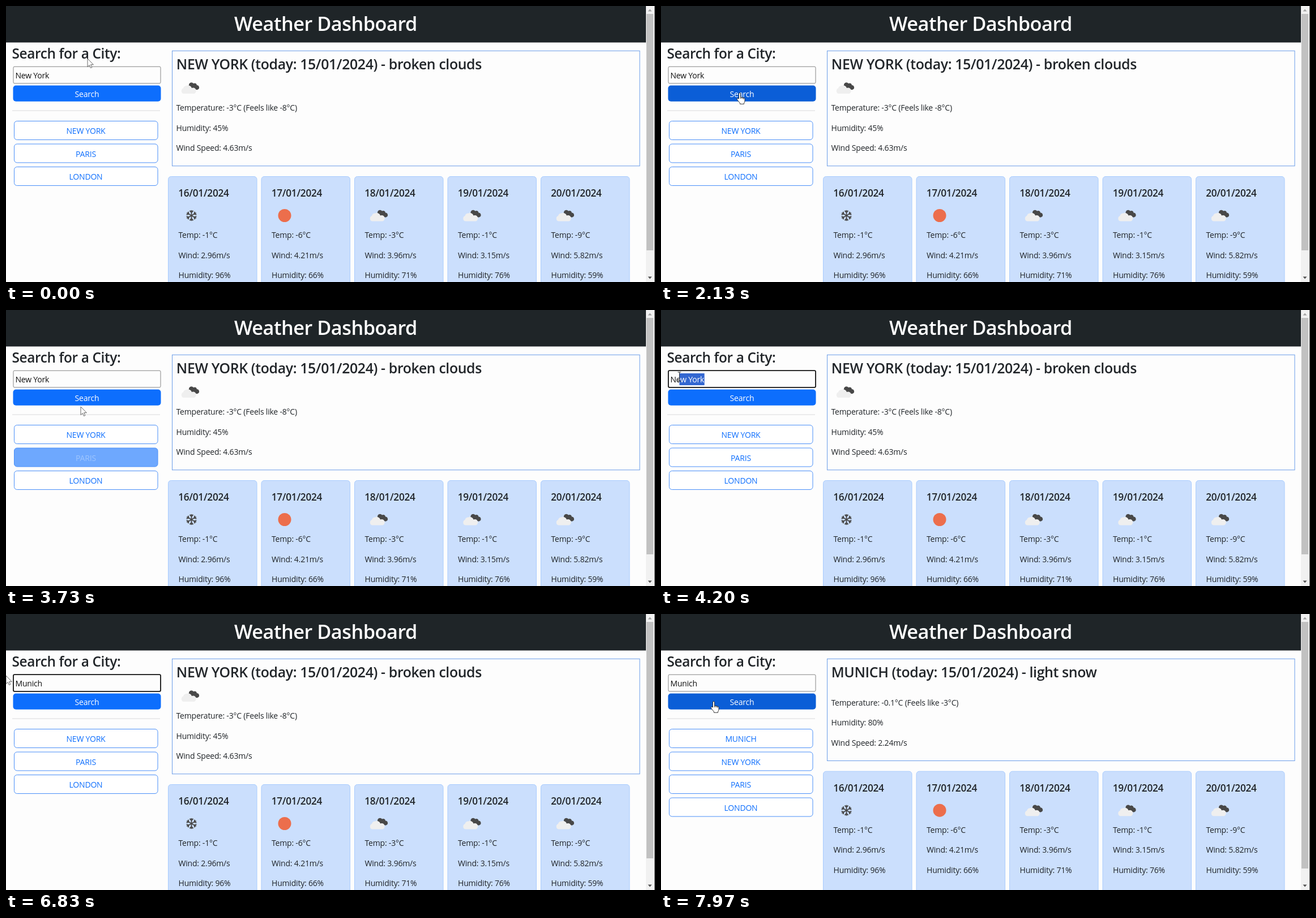
Write an HTML page that moves like this. It is 1146 by 488 pixels and loops after 8 s.

```html
<!DOCTYPE html>
<html lang="en">
<head>
<meta charset="utf-8">
<title>Weather Dashboard</title>
<style>
html, body { margin: 0; width: 100%; height: 100%; overflow: hidden; background: #fdfdfd; }
svg { display: block; }
text { font: 14px "Open Sans", "Noto Sans", sans-serif; letter-spacing: -.0145em; fill: #212529; }
.head { font-weight: 600; font-size: 24.4px; }
.date { font-weight: 600; font-size: 17.2px; }
.mid { text-anchor: middle; }
</style>
</head>
<body>
<svg width="1146" height="488" viewBox="0 0 1146 488">
  <defs>
    <g id="cloud">
      <path fill="#484848" d="M18 12a4 4 0 0 1-3-7a4.500 4.500 0 0 1 8-3a4 4 0 0 1 6 3a4 4 0 0 1 2 7.500q-2 1.500-4 0z"/>
      <path fill="#efefef" d="M5.500 20a5 5 0 0 1-.5-9.500a6 6 0 0 1 6-4.500a6.500 6.500 0 0 1 9 4a5 5 0 0 1 4.500 10z"/>
    </g>
    <path id="arm" d="M0-9.500V9.500M-3-8.500L0-5.500 3-8.500M-3 8.500L0 5.500 3 8.500"/>
    <g id="snow" fill="none" stroke="#484848" stroke-width="1.900">
      <use href="#arm"/><use href="#arm" transform="rotate(60)"/><use href="#arm" transform="rotate(120)"/>
    </g>
    <circle id="sun" r="11.500" fill="#ec6e4c"/>
    <clipPath id="selClip"><rect id="clipBox" y="112" height="21"/></clipPath>
  </defs>

  <rect width="1130" height="64.500" fill="#1f2528"/>
  <text x="564.500" y="43.500" class="mid" style="font-weight:600;font-size:34.300px;fill:#fff">Weather Dashboard</text>

  <text x="10.500" y="93" class="head">Search for a City:</text>
  <rect id="field" x="13" y="107.200" width="260" height="29.600" rx="2" fill="#fdfdfd"/>
  <text id="typed" x="16.500" y="128" style="fill:#111"></text>
  <rect id="caret" y="114" width="1" height="18"/>
  <g id="selection">
    <rect id="selBox" y="112" height="21" fill="#3367d1"/>
    <text x="16.500" y="128" clip-path="url(#selClip)" style="fill:#fff">New York</text>
  </g>
  <rect id="search" x="12.500" y="140.500" width="261" height="28.200" rx="5"/>
  <text x="143" y="161" class="mid" style="fill:#fff">Search</text>
  <path d="M11 185H272" stroke="#d9dadb"/>
  <g id="list"></g>

  <rect id="panel" x="293.500" y="79.300" width="825.500" fill="none" stroke="#6a9ce8"/>
  <text id="headline" x="300.800" y="111.500" class="head" style="font-size:24.850px"></text>
  <use id="todayIcon" href="#cloud" x="308" y="135"/>
  <g id="details">
    <text x="300.500" y="185"></text><text x="300.500" y="220.500"></text><text x="300.500" y="256.300"></text>
  </g>
  <g id="forecast"></g>

  <rect x="1130" width="15" height="488" fill="#f1f1f1"/>
  <rect id="thumb" x="1131" y="14" width="12" fill="#c1c1c1"/>
  <path d="M1133.500 9.500l3.500-4 3.500 4z" fill="#a3a3a3"/>
  <path d="M1133.500 478.500l3.500 4 3.500-4z" fill="#505050"/>
  <path d="M1145.500 0V488" stroke="#444"/>

  <g id="cursor">
    <path id="arrow" d="M0 0V14.500L3.300 11.500 5.500 16.500 7.800 15.500 5.600 10.700H10.300Z" fill="#fff" stroke="#555" stroke-width=".9"/>
    <g id="hand" stroke="#222" stroke-width=".9">
      <path fill="#fff" d="M-1.500 10V1a1.500 1.500 0 0 1 3 0V7l5.500 1.300q2 .5 2 2.500v3q0 2-1.500 4v1.500h-7v-1.500l-4.500-5.500q-1.500-2.300 0-3 1-.4 2.500.700z"/>
      <path fill="none" d="M1.500 7v3M4 7.700v2.500M6.500 8.300v2.500"/>
    </g>
    <path id="beam" d="M-3-8H3M0-8V8M-3 8H3" stroke="#333" fill="none"/>
  </g>
</svg>
<script>
const LOOP = 8000, LOADED = 7970, CLICK = 7800, PRESS = 3990, RISE = 23.3;
const KEY_TIMES = [5200, 5500, 5630, 6030, 6170, 6270];
const BLUE = [13, 110, 253], DARK = [11, 94, 215], WHITE = [255, 255, 255];

// Pointer path: time, x, y
const PATH = [
  [60, 144, 93], [100, 152, 144], [428, 152, 144], [430, 157, 152], [630, 157, 152],
  [890, 150, -22], [1270, 150, -22], [1800, 139, 150], [2030, 139, 150], [2130, 139, 154],
  [2300, 139, 158], [2630, 139, 158], [3130, 135, 262], [3570, 135, 262], [3672, 134, 246],
  [3675, 132, 196], [3730, 132, 171], [3990, 84, 122], [4330, 8, 116], [4400, 8, 116],
  [4530, 0, 109], [6970, 0, 109], [7770, 93, 155]
];
const CITIES = ["NEW YORK", "PARIS", "LONDON"];
const BEFORE = ["NEW YORK (today: 15/01/2024) - broken clouds",
  "Temperature: -3°C (Feels like -8°C)", "Humidity: 45%", "Wind Speed: 4.63m/s"];
const AFTER = ["MUNICH (today: 15/01/2024) - light snow",
  "Temperature: -0.1°C (Feels like -3°C)", "Humidity: 80%", "Wind Speed: 2.24m/s"];
const DAYS = [["snow", -1, "2.96", 96], ["sun", -6, "4.21", 66], ["cloud", -3, "3.96", 71],
  ["cloud", -1, "3.15", 76], ["cloud", -9, "5.82", 59]];

const $ = id => document.getElementById(id);
const set = (el, attrs) => { for (const k in attrs) el.setAttribute(k, attrs[k]); };
const show = (el, on) => { el.style.visibility = on ? "visible" : "hidden"; };
const mix = (a, b, f) => `rgb(${a.map((v, i) => Math.round(v + (b[i] - v) * f))})`;
const clamp = (v, lo, hi) => Math.min(hi, Math.max(lo, v));
const rowTop = i => 204 + 40.5 * i;

$("forecast").innerHTML = DAYS.map(([icon, temp, wind, humidity], i) => {
  const x = 286.5 + 164.5 * i, tx = x + 18;
  const [ix, iy] = icon === "cloud" ? [x + 25.5, 360.5] : [x + 41, 370.5];
  return `<rect x="${x}" y="301.500" width="156.500" height="260" rx="5" fill="#cbdffd" stroke="#a9ccfe"/>
    <text class="date" x="${tx - .3}" y="337">${16 + i}/01/2024</text>
    <use href="#${icon}" x="${ix}" y="${iy}"/>
    <text x="${tx}" y="410">Temp: ${temp}°C</text>
    <text x="${tx}" y="445.500">Wind: ${wind}m/s</text>
    <text x="${tx}" y="481">Humidity: ${humidity}%</text>`;
}).join("");

$("list").innerHTML = [0, 1, 2, 3].map(i =>
  `<g><rect x="14.500" y="${rowTop(i) - .5}" width="253.500" height="33" rx="5" stroke="#4b8ff8"/>
   <text class="mid" x="141" y="${rowTop(i) + 22}"></text></g>`).join("");
const rows = [...$("list").children];

function pointer(t) {
  const i = PATH.findIndex(k => k[0] > t);
  if (i < 1) return PATH[i ? PATH.length - 1 : 0].slice(1);
  const [t0, x0, y0] = PATH[i - 1], [t1, x1, y1] = PATH[i];
  const u = (t - t0) / (t1 - t0), e = u * u * (3 - 2 * u);
  return [x0 + (x1 - x0) * e, y0 + (y1 - y0) * e];
}

// Which control lies under the pointer: row index, "search", "field" or null
function target(t) {
  const [x, y] = pointer(t);
  if (x < 13 || x > 273) return null;
  if (y >= 107 && y <= 137) return "field";
  if (y >= 141 && y <= 169) return "search";
  const i = [0, 1, 2].findIndex(n => y >= rowTop(n) && y <= rowTop(n) + 33);
  return i < 0 ? null : i;
}

// Hover colours fade over 150 ms
function hover(t, name) {
  let hits = 0;
  for (let k = 0; k < 15; k++) hits += target(t - k * 10) === name;
  return hits / 15;
}

function drawField(t) {
  const focus = t >= PRESS && t < CLICK, first = KEY_TIMES[0];
  set($("field"), { stroke: focus ? "#111" : "#858585", "stroke-width": focus ? 1.8 : 1 });
  const typed = $("typed");
  typed.textContent = t < first ? "New York" : "Munich".slice(0, KEY_TIMES.filter(k => k <= t).length);
  const end = 17 + typed.getComputedTextLength();
  set($("caret"), { x: end });
  show($("caret"), t >= first && t < 6830);

  const selecting = t >= PRESS && t < first;
  show($("selection"), selecting);
  if (selecting) {
    const x = clamp(pointer(t)[0], 17, end);
    for (const id of ["selBox", "clipBox"]) set($(id), { x, width: end - x });
  }
}

function drawWeather(loaded) {
  const [title, ...lines] = loaded ? AFTER : BEFORE;
  const shift = `translate(0 ${loaded ? -RISE : 0})`;
  $("headline").textContent = title;
  lines.forEach((s, i) => { $("details").children[i].textContent = s; });
  set($("details"), { transform: shift });
  set($("forecast"), { transform: shift });
  set($("panel"), { height: loaded ? 180.2 : 203.5 });
  set($("thumb"), { height: loaded ? 436 : 418 });
  show($("todayIcon"), !loaded);
}

function drawList(t, loaded) {
  const names = loaded ? ["MUNICH", ...CITIES] : CITIES;
  rows.forEach((row, i) => {
    const f = hover(t, i), [box, label] = row.children;
    show(row, i < names.length);
    label.textContent = names[i] || "";
    label.style.fill = mix(BLUE, WHITE, f);
    set(box, { fill: mix(WHITE, BLUE, f) });
  });
}

function drawCursor(t) {
  const over = target(t), kind = over === null ? "arrow" : over === "field" ? "beam" : "hand";
  set($("cursor"), { transform: `translate(${pointer(t)})` });
  for (const id of ["arrow", "hand", "beam"]) show($(id), id === kind);
}

const start = performance.now();
function frame() {
  const t = (performance.now() - start) % LOOP, loaded = t >= LOADED;
  drawField(t);
  drawWeather(loaded);
  drawList(t, loaded);
  set($("search"), { fill: mix(BLUE, DARK, hover(t, "search")) });
  drawCursor(t);
  requestAnimationFrame(frame);
}
frame();
</script>
</body>
</html>
```
